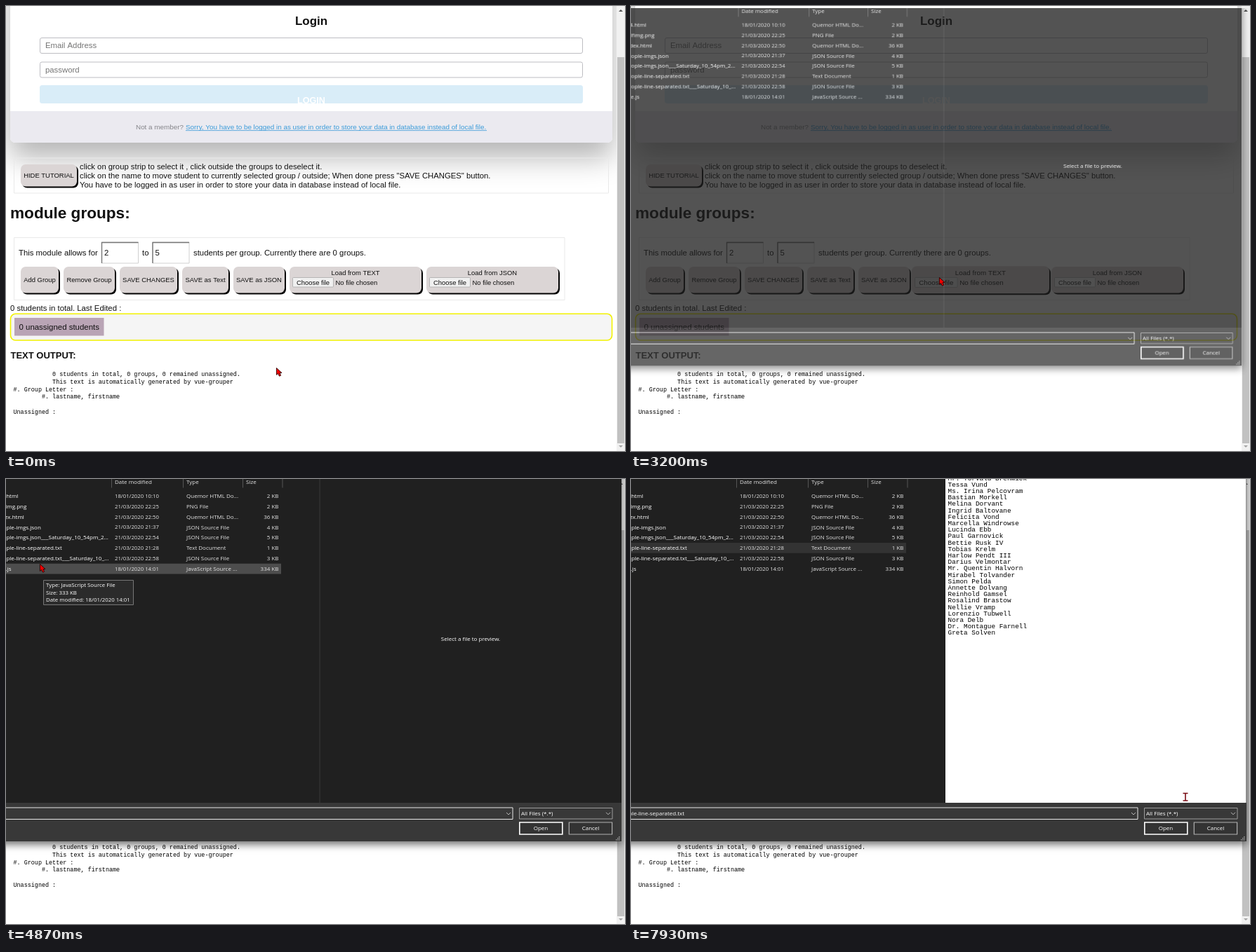
Write an HTML page with a canvas that moves like this. It is 882 px wide and 635 px high and loops after 8000 ms.

```html
<!DOCTYPE html>
<html lang="en">
<head>
<meta charset="utf-8">
<title>Group loader</title>
<style>
html, body { margin: 0; width: 100%; height: 100%; overflow: hidden; background: #fff; }
canvas { display: block; }
</style>
</head>
<body>
<canvas id="stage" width="882" height="635"></canvas>
<script>
const W = 882, H = 635, LOOP = 8000, STEP = 1000 / 15;
const SANS = '"Liberation Sans", Arial, sans-serif';
const UI = '"Open Sans", "Noto Sans", sans-serif';
const MONO = '"Liberation Mono", monospace';
const BODY = 11.35, SMALL = 9.45;

const stage = document.getElementById('stage').getContext('2d');
const layerCanvas = document.createElement('canvas');
layerCanvas.width = W + 40;
layerCanvas.height = H;
const layer = layerCanvas.getContext('2d');
const LAYER_X = 20;
let g = stage;

const ramp = (t, a, b) => Math.min(1, Math.max(0, (t - a) / (b - a)));
const smooth = u => u * u * (3 - 2 * u);

// y is the vertical centre of the capitals
function text(s, x, y, size, { font = SANS, color = '#111', align = 'left', bold = false } = {}) {
  g.font = `${bold ? 'bold ' : ''}${size}px ${font}`;
  g.fillStyle = color;
  g.textAlign = align;
  g.fillText(s, x, y + size * 0.35);
}

function box(x, y, w, h, fill, stroke, radius = 0, line = 1) {
  g.beginPath();
  g.roundRect(x, y, w, h, radius);
  if (fill) { g.fillStyle = fill; g.fill(); }
  if (stroke) { g.strokeStyle = stroke; g.lineWidth = line; g.stroke(); }
}

function poly(points, fill, stroke, line = 1, closed = true) {
  g.beginPath();
  points.forEach(([x, y]) => g.lineTo(x, y));
  if (closed) g.closePath();
  if (fill) { g.fillStyle = fill; g.fill(); }
  if (stroke) { g.strokeStyle = stroke; g.lineWidth = line; g.stroke(); }
}

function withShadow(color, blur, dy, draw) {
  g.save();
  g.shadowColor = color;
  g.shadowBlur = blur;
  g.shadowOffsetY = dy;
  draw();
  g.restore();
}

/* ---------- web page ---------- */

function keycap(x, y, w, h, label) {
  box(x + 2, y + 2, w, h, '#000', null, 7);
  box(x, y, w, h, '#dbd5d5', null, 7);
  if (label) text(label, x + w / 2, y + h / 2 + 0.4, SMALL, { align: 'center' });
}

function filePicker(x, label, scale, face) {
  g.save();
  g.translate(x + 95, 391.5);
  g.scale(scale, scale);
  g.translate(-95, -391.5);
  keycap(0, 372, 188, 37.5);
  text(label, 94, 381, SMALL, { align: 'center' });
  box(4.5, 387.5, 58, 13.5, face, '#a9a9a9', 1, 0.8);
  text('Choose file', 33.5, 394.2, SMALL, { align: 'center' });
  text('No file chosen', 65.5, 394.2, SMALL);
  g.restore();
}

function numberField(x, value) {
  box(x, 337, 52, 30, '#fff', '#d0d0d0');
  poly([[x, 367], [x, 337.5], [x + 52, 337.5]], null, '#777', 1.4, false);
  text(value, x + 3.5, 352, BODY);
}

function loginCard() {
  withShadow('rgba(0,0,0,.3)', 42, 21, () => box(6, -60, 858, 255, '#fff', null, 7));
  box(6, 150, 858, 45, '#ebeaf0', null, [0, 0, 7, 7]);
  text('Login', 435, 21, 16.95, { bold: true, align: 'center' });
  [['Email Address', 45], ['password', 79.5]].forEach(([label, y]) => {
    box(48.5, y + 0.5, 773, 22, '#fff', '#bdbdc2', 2.5);
    text(label, 56, y + 11.5, BODY, { color: '#757575' });
  });
  box(48, 113, 774, 26, '#d9edf8', null, 3.5);
  g.save();
  g.beginPath();
  g.rect(48, 113, 774, 26);
  g.clip();
  text('LOGIN', 435, 134.5, 12.6, { bold: true, color: '#fff', align: 'center' });
  g.restore();
  text('Not a member?', 185, 173, 9.88, { color: '#85858a' });
  text('Sorry, You have to be logged in as user in order to store your data in database instead of local file.',
    256, 173, 9.88, { color: '#3a9bd9' });
  g.fillStyle = '#3a9bd9';
  g.fillRect(256, 177.3, 429, 0.8);
}

function scrollbar() {
  box(870, 0, 12, H, '#f1f1f1');
  box(871, 73, 10, 551, '#c1c1c1');
  poly([[873, 8], [876, 5], [879, 8]], '#505050');
  poly([[873, 627], [876, 630], [879, 627]], '#a3a3a3');
}

function page(t) {
  box(0, 0, W, H, '#fff');
  loginCard();
  scrollbar();

  box(11.5, 217, 847, 50, null, '#e9e9e9');
  keycap(21, 226, 80, 31.5, 'HIDE TUTORIAL');
  ['click on group strip to select it , click outside the groups to deselect it.',
   'click on the name to move student to currently selected group / outside; When done press "SAVE CHANGES" button.',
   'You have to be logged in as user in order to store your data in database instead of local file.'
  ].forEach((s, i) => text(s, 105, 229.2 + i * 12.7, 11.3));

  text('module groups:', 6, 295.5, 22.6, { bold: true });
  box(11.5, 330.5, 784.5, 89, null, '#e9e9e9');
  text('This module allows for', 18, 351.7, BODY);
  numberField(136.5, '2');
  text('to', 194, 351.7, BODY);
  numberField(209, '5');
  text('students per group. Currently there are 0 groups.', 267, 351.7, BODY);

  [['Add Group', 21, 54], ['Remove Group', 82, 73], ['SAVE CHANGES', 162, 82],
   ['SAVE as Text', 251, 66], ['SAVE as JSON', 324, 73]
  ].forEach(([label, x, w]) => keycap(x, 372, w, 37.5, label));
  const pressed = t >= 2130 && t < 2330;
  const face = pressed ? '#f7f7f7' : t >= 930 ? '#e5e5e5' : '#f0f0f0';
  filePicker(599, 'Load from JSON', 1, '#f0f0f0');
  filePicker(404, 'Load from TEXT', 1 + 0.043 * ramp(t, 660, 866), face);

  text('0 students in total. Last Edited :', 6, 431.5, BODY);
  box(6.5, 439.3, 857, 37.7, '#f5f5f5', '#f2f200', 7, 1.6);
  box(12, 445, 127.5, 25.5, '#b9a4b5');
  text('0 unassigned students', 18.5, 457.7, 11.45);

  text('TEXT OUTPUT:', 6.5, 498.5, 13, { bold: true });
  ['           0 students in total, 0 groups, 0 remained unassigned.',
   '           This text is automatically generated by vue-grouper',
   '#. Group Letter :', '        #. lastname, firstname', '', 'Unassigned :'
  ].forEach((s, i) => text(s, 10.5, 525.3 + i * 10.65, 8.43, { font: MONO, color: '#000' }));
}

/* ---------- file dialog ---------- */

const ROW_TOP = 16.4, ROW_H = 14.9, LIST_RIGHT = 392, CHOSEN = 5;
const JSON_TYPE = 'JSON Source File', HTML_TYPE = 'Quemor HTML Do...';
const files = [
  ['f14.html', '18/01/2020 10:10', HTML_TYPE, '2 KB'],
  ['selfimg.png', '21/03/2020 22:25', 'PNG File', '2 KB'],
  ['index.html', '21/03/2020 22:50', HTML_TYPE, '36 KB'],
  ['people-imgs.json', '21/03/2020 21:37', JSON_TYPE, '4 KB'],
  ['people-imgs.json___Saturday_10_54pm_2...', '21/03/2020 22:54', JSON_TYPE, '5 KB'],
  ['people-line-separated.txt', '21/03/2020 21:28', 'Text Document', '1 KB'],
  ['people-line-separated.txt___Saturday_10_...', '21/03/2020 22:58', JSON_TYPE, '3 KB'],
  ['vue.js', '18/01/2020 14:01', 'JavaScript Source ...', '334 KB']
];
const people = `Mr. Torvald Brenwick
Tessa Vund
Ms. Irina Pelcovram
Bastian Morkell
Melina Dorvant
Ingrid Baltovane
Felicita Vond
Marcella Windrowse
Lucinda Ebb
Paul Garnovick
Bettie Rusk IV
Tobias Krelm
Harlow Pendt III
Darius Velmontar
Mr. Quentin Halvorn
Mirabel Tolvander
Simon Pelda
Annette Dolvang
Reinhold Gamsel
Rosalind Brastow
Nellie Vramp
Lorenzio Tubwell
Nora Delb
Dr. Montague Farnell
Greta Solven`.split('\n');

const ui = (s, x, y, opts = {}) => text(s, x, y, opts.size || 8, { font: UI, color: '#e4e4e4', ...opts });
const chevron = (x, y) => poly([[x - 3, y - 1.5], [x, y + 1.5], [x + 3, y - 1.5]], null, '#c8c8c8', 0.9, false);

function fileList(t, pointer) {
  const selected = t >= 5930, dragging = selected && t < 6060;
  const over = pointer.x < LIST_RIGHT && !dragging && t >= 3800
    ? Math.floor((pointer.y - ROW_TOP) / ROW_H) : -1;

  [150.5, 252.5, 337.5, 394].forEach(x => box(x - 0.4, 0, 0.8, 12.5, '#636363'));
  ui('Date modified', 155, 3.8);
  ui('Type', 257, 3.8);
  ui('Size', 342, 3.8);

  files.forEach(([name, date, type, size], i) => {
    const chosen = selected && i === CHOSEN;
    const fill = chosen ? (over === i ? '#666' : '#333') : over === i ? '#4d4d4d' : null;
    if (fill) box(-20, ROW_TOP + i * ROW_H, LIST_RIGHT + 20, ROW_H, fill);
    const y = 24 + i * ROW_H;
    ui(name, -13.8, y, { color: '#fff' });
    ui(date, 155, y, { size: 7.75 });
    ui(type, 257, y);
    ui(size, 388.5, y, { align: 'right' });
  });
}

function preview(t) {
  if (t < 5930) {
    box(446.6, 0, 0.9, 462, '#3a3a3a');
    ui('Select a file to preview.', 662, 228.5, { color: '#fff', align: 'center' });
    return;
  }
  box(448, 0, 428.5, 462, '#fff');
  people.forEach((s, i) => text(s, 451.5, -1.6 + i * 9.2, 9.4, { font: MONO, color: '#000' }));
}

function dialogFooter(t) {
  box(-20, 462, 897, 55, '#383838');
  box(-20, 469, 742, 16.5, '#383838', '#e8e8e8');
  if (t >= 5990) ui('people-line-separated.txt', -17.5, 477.6, { color: '#fff' });
  chevron(716, 477.5);
  box(731.5, 469.5, 132.5, 15.5, '#383838', '#9b9b9b');
  ui('All Files (*.*)', 734, 477.3, { color: '#fff' });
  chevron(858, 477.3);
  box(731.8, 490, 61, 17, '#333', '#fff', 0, 1.6);
  ui('Open', 762, 498.5, { color: '#fff', align: 'center' });
  box(802.3, 490, 61.3, 17, '#333', '#b0b0b0', 0, 1.2);
  ui('Cancel', 833, 498.5, { color: '#fff', align: 'center' });
  for (let r = 0; r < 3; r++)
    for (let c = 2 - r; c < 3; c++) box(869 + c * 2.1, 510 + r * 2.1, 1.2, 1.2, '#bdbdbd');
}

function tooltip(x, y, w, h, lines, alpha) {
  if (alpha <= 0) return;
  g.save();
  g.globalAlpha = alpha;
  box(x + 0.5, y + 0.5, w - 1, h - 1, '#2b2b2b', '#767676');
  lines.forEach((s, i) => ui(s, x + 4, y + 7.7 + i * 10.5, { color: '#fff', size: 7.85 }));
  g.restore();
}

function dragGhost(x, y) {
  const shade = g.createLinearGradient(0, y - 66, 0, y + 7);
  shade.addColorStop(0, 'rgba(112,122,128,.72)');
  shade.addColorStop(1, 'rgba(120,138,150,.6)');
  box(x - 36, y - 66, 74, 73, shade, null, 3);
  poly([[x + 10, y + 11], [x + 15, y + 16], [x + 19, y + 11], [x + 15, y + 20], [x + 11, y + 17]], '#7fa6d6', '#e8eef6', 0.9);
}

function dialog(t, pointer) {
  layer.clearRect(0, 0, layerCanvas.width, H);
  layer.save();
  layer.translate(LAYER_X, 0);
  g = layer;
  withShadow('rgba(0,0,0,.6)', 11, 4, () => box(-60, -60, 937, 577, '#202020'));
  fileList(t, pointer);
  preview(t);
  dialogFooter(t);
  g = stage;
  layer.restore();

  // opens by fading in while growing around the window's centre
  const stepIn = Math.min(3, Math.round((t - 3133) / STEP));
  const alpha = [0.35, 0.767, 0.95, 1][stepIn];
  const scale = [0.965, 0.987, 0.997, 1][stepIn];
  g.save();
  g.globalAlpha = alpha;
  g.translate(345, 228);
  g.scale(scale, scale);
  g.drawImage(layerCanvas, -345 - LAYER_X, -228);
  g.restore();

  tooltip(53, 144, 129, 36,
    ['Type: JavaScript Source File', 'Size: 333 KB', 'Date modified: 18/01/2020 14:01'],
    ramp(t, 4400, 4670) * (1 - ramp(t, 4930, 5200)));
  if (t >= 7060 && t < 7325)
    tooltip(141, 133, 244, 42,
      ['people-line-separated.txt___Saturday_10_58pm', 'Type: JSON Source File', 'Size: 2.29 KB'], 1);
  if (t >= 5930 && t < 6060) dragGhost(pointer.x, pointer.y);
}

/* ---------- pointer ---------- */

const path = [
  [0, 385, 516], [866, 439, 387], [3733, 439, 387], [4000, 75, 68], [4133, 48, 121],
  [4867, 48, 121], [5067, 47, 72], [5200, 47, 107], [5333, 47, 107], [5533, 46, 101],
  [6400, 46, 101], [6800, 136, 110], [7000, 150, 113], [7266, 501, 240],
  [7600, 501, 240], [7933, 790, 454]
];

function pointerAt(t) {
  const next = path.findIndex(p => p[0] > t);
  if (next < 0) { const [, x, y] = path[path.length - 1]; return { x, y }; }
  const [t0, x0, y0] = path[next - 1], [t1, x1, y1] = path[next];
  const u = smooth(ramp(t, t0, t1));
  return { x: x0 + (x1 - x0) * u, y: y0 + (y1 - y0) * u };
}

function drawPointer(t, { x, y }) {
  g.save();
  g.translate(x, y);
  if (t >= 5930 && x > 448 && y < 462) {
    [['#fff', 3], ['#7a0c14', 1.6]].forEach(([color, line]) => {
      g.beginPath();
      g.moveTo(-3.5, -5.5); g.lineTo(3.5, -5.5);
      g.moveTo(0, -5.5); g.lineTo(0, 5);
      g.moveTo(-3.5, 5); g.lineTo(3.5, 5);
      g.strokeStyle = color;
      g.lineWidth = line;
      g.stroke();
    });
  } else {
    poly([[0.4, 0.5], [0.4, 10.3], [2.6, 8.5], [4.5, 12.2], [6.6, 11.2], [5, 7.8], [8, 7.5]], '#f00000', '#2a0000', 0.9);
    if (t >= 2530 && t < 2860) {
      g.beginPath();
      g.arc(12.5, 7.5, 3.8, 0, Math.PI * 2);
      g.strokeStyle = '#2f8fd8';
      g.lineWidth = 1.8;
      g.stroke();
    }
  }
  g.restore();
}

function render(now) {
  const t = Math.floor(((now % LOOP) + 4) / STEP) * STEP + 1;
  const pointer = pointerAt(t);
  page(t);
  if (t >= 3130) dialog(t, pointer);
  drawPointer(t, pointer);
}

const start = performance.now();
function tick() {
  render(performance.now() - start);
  requestAnimationFrame(tick);
}
tick();
</script>
</body>
</html>
```
